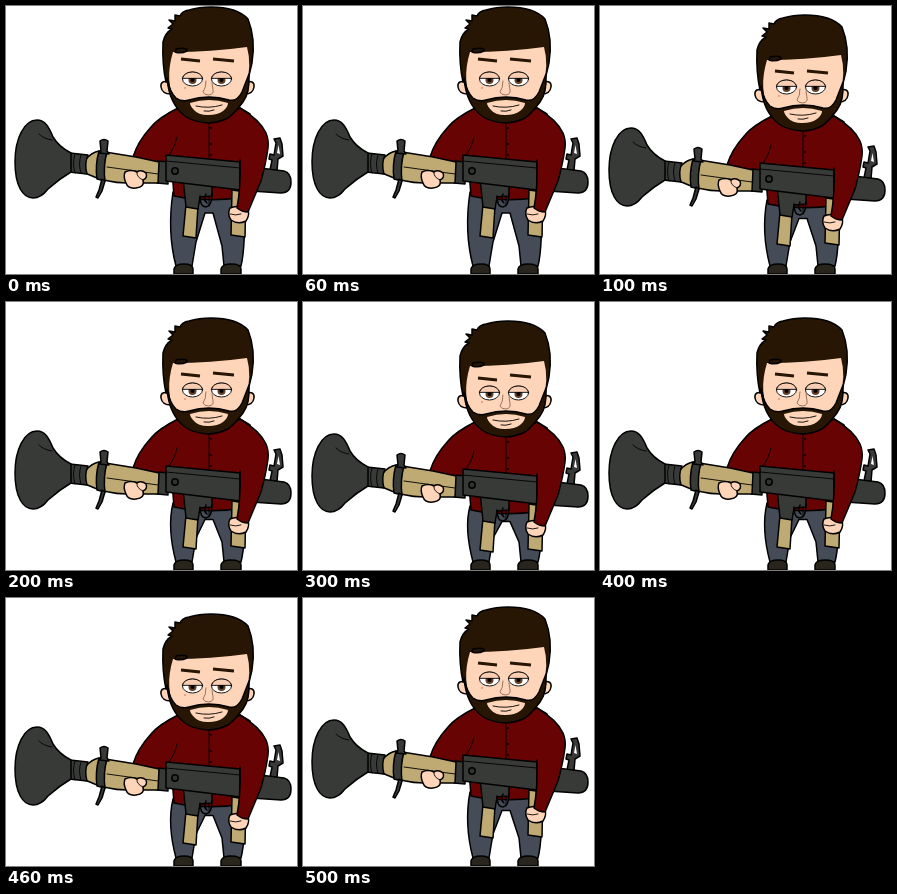
These frames come from a looping animation (291 px wide and 268 px high, 0.6 s). An HTML page:

```html
<!DOCTYPE html>
<html lang="en">
<head>
<meta charset="utf-8">
<title>Idle stance</title>
<style>
html, body { margin: 0; width: 100%; height: 100%; overflow: hidden; background: #fff; }
svg { display: block; width: 100vw; height: 100vh; }
.ln { stroke: #000; stroke-width: 1.5; stroke-linejoin: round; stroke-linecap: round; }
.thin { fill: none; stroke: #000; stroke-width: .9; stroke-linecap: round; }
.skin { fill: #ffd5b9; }
.hair { fill: #261603; }
.shirt { fill: #670302; }
.metal { fill: #383a38; }
.wood { fill: #bfaa74; }
.jeans { fill: #454c57; }
</style>
</head>
<body>
<svg viewBox="0 0 291 268" preserveAspectRatio="none">
  <path id="legs" class="jeans ln"/>
  <path class="ln" fill="#29241c" d="M168 268V263Q169 258 178 258Q187 258 187 263V268ZM215 268V263Q216 258 225 258Q235 258 235 263V268Z"/>

  <g id="body">
    <!-- torso and front sleeve -->
    <path class="shirt ln" d="M172 102C158 109 150 115 145 121C135 132 130 141 127 151L149 170L165 153L168 190Q203 197 238 191L244 108L234 102Q205 118 172 102Z"/>
    <path class="thin" d="M203 117V200M163 149Q169 141 171 131"/>
    <g><circle cx="205" cy="122" r=".9"/><circle cx="205" cy="138" r=".9"/><circle cx="205" cy="149" r=".9"/></g>

    <!-- launcher -->
    <path class="metal ln" d="M264 164L266 154L263 153L264 148L268 149L270 137L268 133L274 132L276 138L277 150L272 153L271 165Z"/>
    <path fill="#fff" d="M271 147L272.5 139L274 148Z"/>
    <path class="metal ln" d="M230 159L278 165Q285 167 285 176Q285 187 275 187L230 184Z"/>
    <path class="wood ln" d="M180 198L192 200L190 232L177 230ZM226 184L240 186L239 231L225 229Z"/>
    <path class="metal ln" d="M177 172L206 176V190L194 191L192 203L180 201Z"/>
    <path class="ln" fill="none" d="M194 190Q194 201 200 201Q206 200 206 188M200 188Q197 194 201 197"/>
    <path class="metal ln" d="M152 155L162 156V178L151 177Z"/>
    <path class="wood ln" d="M79 154Q86 146 93 145L130 151L153 156L152 177L121 177Q100 177 79 167Z"/>
    <path class="thin" d="M101 161L152 168"/>
    <path class="metal ln" d="M64 147L82 149Q78 158 81 168L63 166Z"/>
    <path class="thin" d="M69 148Q66 157 69 167M75 149Q72 158 75 167"/>
    <path class="metal ln" d="M31 114C18 114 9 133 9 156C9 180 17 192 27 192C34 192 39 187 42 183Q53 173 65 166V147Q53 141 47 131C43 121 39 114 31 114Z"/>
    <path class="thin" d="M33 128Q38 133 46 134"/>
    <path class="metal ln" d="M93 145L101 146Q97 160 99 175L91 173Q89 159 93 145Z"/>
    <path class="metal ln" d="M94 135Q98 132 102 135L101 145L103 148L93 147L95 145ZM96 173L99 175L96 185L92 192L90 191L93 184Z"/>
    <path class="metal ln" d="M160 149L234 156V184L160 175Z"/>
    <path class="thin" d="M160 155L234 162"/>
    <circle class="ln" cx="169" cy="165" r="3.2" fill="#303230"/>

    <!-- hands and rear sleeve -->
    <path class="skin ln" d="M119 166Q125 163 131 166Q135 163 140 167Q142 172 137 174Q139 181 130 182Q122 183 120 177Q117 171 119 166Z"/>
    <path class="thin" d="M131 166Q130 171 137 174"/>
    <path class="skin ln" d="M224 202Q232 198 242 204Q244 209 240 215Q232 219 225 214Q221 208 224 202Z"/>
    <path class="thin" d="M224 208Q230 210 235 208"/>
    <path class="shirt" d="M234 102Q254 114 260 127Q263 134 262 142Q260 157 255 175L242 206Q236 206 231 202Q235 180 234 128Z"/>
    <path class="ln" fill="none" d="M234 102Q254 114 260 127Q263 134 262 142Q260 157 255 175L242 206Q236 206 231 202Q235 180 234 154"/>

    <!-- head -->
    <path class="skin ln" d="M163 76Q154 74 155 81Q156 88 165 88ZM240 76Q249 74 248 81Q247 88 239 88Z"/>
    <path class="hair ln" d="M160 76Q156 58 157 36Q159 27 166 23L162 22L167 18L163 14L169 15L169 9L174 10Q176 5 183 4Q193 1 205 1Q231 1 242 13Q250 33 246 57L241 78Z"/>
    <path class="skin" d="M167 46Q205 46 241 41Q246 59 240 80L236 96L203 114L170 98Q158 75 167 46Z"/>
    <path class="hair ln" d="M170 43Q182 41 181 45Q175 48 169 46Z"/>
    <path class="hair ln" d="M161 72Q164 87 170 92Q176 96 183 94Q203 88 223 94Q231 96 236 86L243 68Q244 87 237 96Q228 108 222 112Q212 117 202 117Q187 116 179 110Q163 98 161 72Z"/>
    <path class="skin" d="M184 97Q203 91 222 97Q222 101 217 105Q212 109 202 109Q192 109 188 104Q184 100 184 97Z"/>
    <path class="thin" d="M190 100Q203 103 216 99M198 105Q203 106 208 104"/>
    <path class="thin" d="M200 75Q200 82 197 86Q198 89 203 89Q208 88 207 84L206 77" style="stroke:#8d6a55"/>
    <circle cx="179" cy="82" r=".9" fill="#d78e70"/>

    <g id="eyes"></g>
    <path id="brows" fill="none" stroke="#261603" stroke-width="3"/>
  </g>
</svg>
<script>
const $ = id => document.getElementById(id);

const eye = x => `
  <ellipse cx="${x}" cy="73" rx="10" ry="7" fill="#fff" class="thin" style="fill:#fff"/>
  <circle cx="${x}" cy="74" r="4" fill="#654124"/>
  <circle cx="${x}" cy="74" r="2"/>
  <path class="thin" style="fill:#f8cdb2" d="M${x - 10} 72Q${x - 8} 66 ${x} 66Q${x + 8} 66 ${x + 10} 72Z"/>`;
$('eyes').innerHTML = eye(186.5) + eye(215.5);

// drop, left brow, right brow (relative to head)
const poses = [[0, 54, 54], [8, 58, 58], [15, 58, 57], [18, 59, 56]];
const order = [0, 1, 2, 3, 2, 1];
const step = 100;
let shown = -1;

function draw([dy, left, right]) {
  const hip = 186 + dy, fork = 207 + dy * .7;
  $('body').setAttribute('transform', `translate(0 ${dy})`);
  $('legs').setAttribute('d',
    `M167 ${hip}Q161 226 170 260H186L190 236L199 ${fork}H207L216 240L218 260H235Q240 240 238 ${hip}Z`);
  $('brows').setAttribute('d',
    `M175 ${left - 1}L194 ${left + 1}M207 ${right - 1}L228 ${right + 1}`);
}

function tick() {
  const i = Math.floor(performance.now() / step) % order.length;
  if (i !== shown) draw(poses[order[shown = i]]);
  requestAnimationFrame(tick);
}
tick();
</script>
</body>
</html>
```
